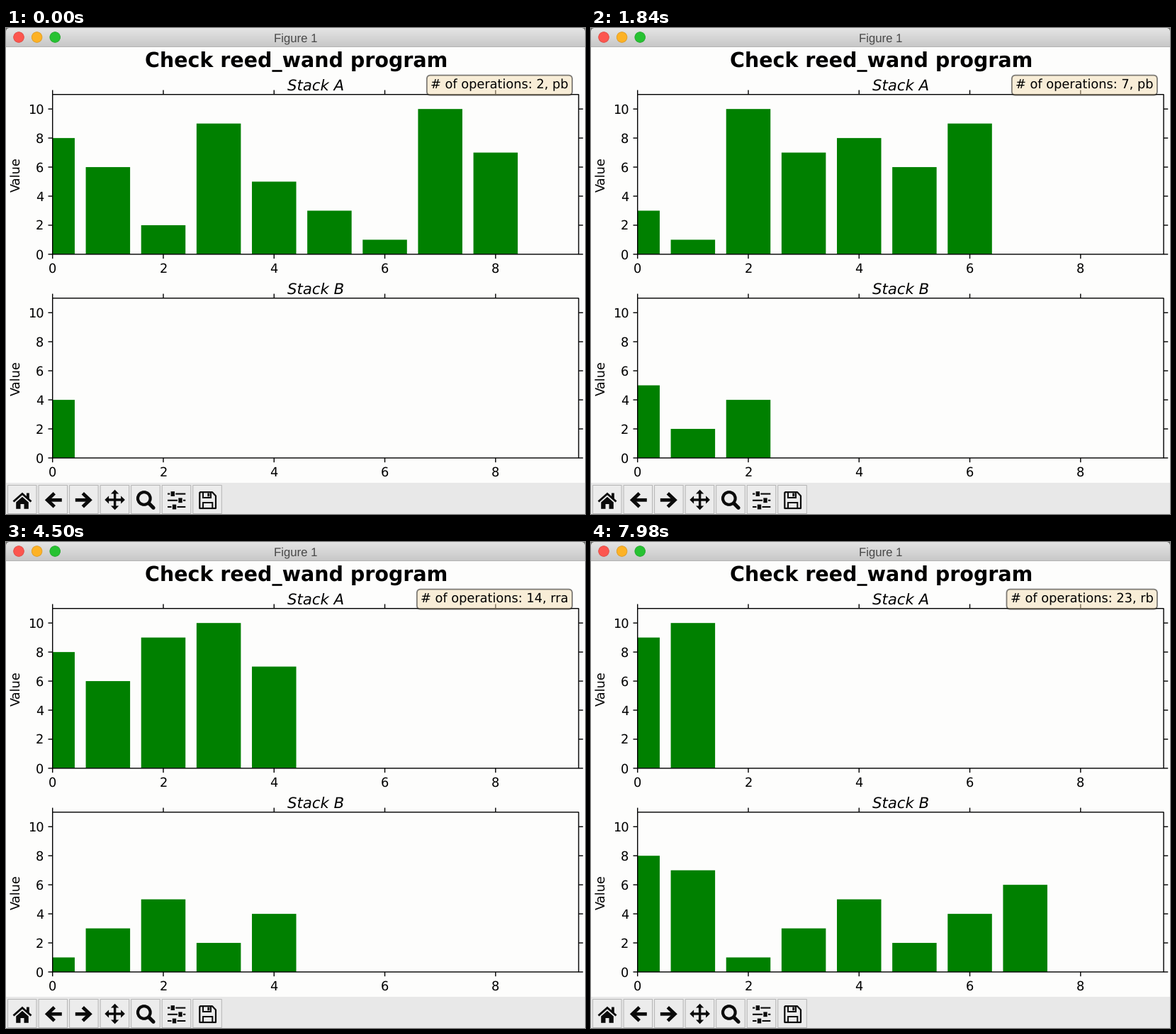
Recreate the animation shown at these times as a matplotlib script. Size 817 by 685 pixels, loop 8 s.

```python
import matplotlib.pyplot as plt
import numpy as np
from matplotlib.animation import FuncAnimation
from matplotlib.patches import Circle, Polygon, Rectangle

W, H = 817, 685
PT = 0.72                      # points per pixel at 100 dpi
EM = 17.73                     # tick label size in pixels
LEFT, UNIT = 65.7, 78.14
RIGHT = LEFT + 9.5 * UNIT
BASES = (318.9, 606.0)
AX_H, TOP_VALUE = 225.2, 11
GREEN, PAPER, BAR = "#008000", "#fdfdfc", "#e8e8e8"
INK = "#0b0b0b"

STEP, FIRST = 380.6, 10.6      # ms per operation, start of the first change
TICK, LOOP = 20, 8000
START_A = [8, 6, 2, 9, 5, 3, 1, 10, 7]
START_B = [4]
OPS = ("ra ra pb ra pb pb pb ra rra rra rra rra rra "
       "pb pb pb ra ra rra rra rb").split()

# the window is a scaled capture: edges and glyphs lie between pixels
plt.rcParams.update({"font.family": "DejaVu Sans", "path.snap": False,
                     "text.hinting": "none"})
fig = plt.figure(figsize=(W / 100, H / 100), dpi=100, facecolor=PAPER)
ax = fig.add_axes([0, 0, 1, 1])
ax.axis("off")


def line(xs, ys, width=1.4, color="black", z=3, cap="butt", join="miter"):
    ax.plot(xs, ys, color=color, lw=width * PT, zorder=z,
            solid_capstyle=cap, solid_joinstyle=join)


def rect(x, y, w, h, color, edge="none", width=0, z=1):
    patch = Rectangle((x, y), w, h, fc=color, ec=edge, lw=width * PT, zorder=z)
    return ax.add_patch(patch)


def poly(points, color=INK, z=6):
    ax.add_patch(Polygon(points, fc=color, ec="none", zorder=z))


def label(x, y, s, size=EM, ha="center", **kw):
    return ax.text(x, y, s, fontsize=size * PT, ha=ha, va="baseline",
                   zorder=5, **kw)


def apply_op(op, a, b):
    a, b = a[:], b[:]
    if op == "pb":
        b.insert(0, a.pop(0))
    elif op == "ra":
        a.append(a.pop(0))
    elif op == "rra":
        a.insert(0, a.pop())
    elif op == "rb":
        b.append(b.pop(0))
    return a, b


def window_bar():
    shade = np.linspace(0.895, 0.785, 26)[:, None, None] * np.ones((1, 1, 3))
    ax.imshow(shade, extent=(0, W, 26, 0), aspect="auto",
              interpolation="nearest", zorder=1)
    line([0, W], [26.5, 26.5], 1, "#b3b3b3")
    lights = (("#fc564f", "#df4640"), ("#fdb225", "#dd9a20"),
              ("#27c232", "#1fa72a"))
    for i, (fill, edge) in enumerate(lights):
        ax.add_patch(Circle((18 + 25.6 * i, 13), 7.3, fc=fill, ec=edge,
                            lw=0.8 * PT, zorder=3))
    label(409, 19.3, "Figure 1", 16.8, color="#484848",
          family="Liberation Sans")
    for x, d in ((0, 1), (W, -1)):
        poly([(x, 0), (x + 4 * d, 0), (x + 1.3 * d, 1.3), (x, 4)], "#6d6f6b")


def plot_frame(base, name):
    top = base - AX_H
    ax.add_patch(Rectangle((LEFT, top), RIGHT - LEFT, AX_H, fc="none",
                           ec="black", lw=1.4 * PT, zorder=3))
    for v in range(0, 10, 2):
        x = LEFT + v * UNIT
        line([x, x], [base, base + 6.2])
        line([x, x], [top - 6.2, top])
        label(x, base + 26, str(v))
    for v in range(0, 11, 2):
        y = base - v * AX_H / TOP_VALUE
        line([LEFT - 6.2, LEFT], [y, y])
        line([RIGHT, RIGHT + 6.2], [y, y])
        label(LEFT - 12.4, y + 6.5, str(v), ha="right")
    label(20, base - AX_H / 2, "Value", rotation=90,
          rotation_mode="anchor")
    label(436.8, top - 4.8, name, 21.3, style="italic")


def arrow_icon(x, d):
    line([x - 8 * d, x + 12 * d], [665.3] * 2, 4.8, INK, 6)
    line([x + 1.5 * d, x - 8.5 * d, x + 1.5 * d], [655.8, 665.3, 674.8],
         4.8, INK, 6)


def move_icon(x, y):
    line([x - 10, x + 10], [y, y], 3.4, INK, 6)
    line([x, x], [y - 10, y + 10], 3.4, INK, 6)
    for dx, dy in ((1, 0), (-1, 0), (0, 1), (0, -1)):
        cx, cy = x + 8.5 * dx, y + 8.5 * dy
        poly([(x + 14.3 * dx, y + 14.3 * dy),
              (cx - 5.6 * dy, cy + 5.6 * dx),
              (cx + 5.6 * dy, cy - 5.6 * dx)])


def toolbar():
    rect(0, 641, W, H - 641, BAR)
    for i in range(7):
        rect(2.5 + 43.55 * i, 644.5, 40.5, 40, "#ececec", "#b5b5b5", 1, 2)

    # home
    line([10.5, 23, 35.5], [667.5, 656.5, 667.5], 2.8, INK, 6)
    rect(29, 655.5, 3.8, 8, INK, z=6)
    poly([(14.2, 668.5), (23, 660.8), (31.8, 668.5), (31.8, 677.8),
          (25.5, 677.8), (25.5, 671), (20.5, 671), (20.5, 677.8),
          (14.2, 677.8)])

    arrow_icon(66.8, 1)
    arrow_icon(109.8, -1)
    move_icon(153.6, 665)

    # zoom
    ax.add_patch(Circle((194.8, 663), 8.8, fc="none", ec=INK, lw=4.2 * PT,
                        zorder=6))
    line([201.5, 208], [669.8, 676.3], 5.2, INK, 6, "round")

    # sliders
    for y, knob in ((656.6, 235.3), (665.8, 246), (675, 237.5)):
        line([228, 253.3], [y, y], 2.1, INK, 6)
        rect(knob - 4, y - 3, 8, 6, "#ececec", z=7)
        rect(knob - 2.7, y - 3.4, 5.4, 6.8, INK, z=8)

    # save
    line([273.3, 291, 296, 296, 273.3, 273.3],
         [654.2, 654.2, 659.5, 677, 677, 654.2], 2.2, INK, 6, join="round")
    line([278, 278, 289, 289], [654.5, 662, 662, 654.5], 2, INK, 6)
    rect(284.3, 655.5, 3, 4.8, INK, z=6)
    line([278, 278, 291.3, 291.3], [677, 669, 669, 677], 2, INK, 6)


window_bar()
label(409.2, 54, "Check reed_wand program", 28.5, weight="bold")
for base, name in zip(BASES, ("Stack A", "Stack B")):
    plot_frame(base, name)
toolbar()

bars = []
for base in BASES:
    row = []
    for i in range(10):
        x0 = max(LEFT, LEFT + (i - 0.4) * UNIT)
        row.append(rect(x0, base, LEFT + (i + 0.4) * UNIT - x0, 0, GREEN))
    bars.append(row)

counter = label(793.6, 85.6, "", ha="right",
                bbox=dict(boxstyle="round,pad=0.3", facecolor="wheat",
                          edgecolor="black", alpha=0.5, linewidth=1.77 * PT))
ax.set_xlim(0, W)
ax.set_ylim(H, 0)

states = [(START_A, START_B, "pb")]
for op in OPS:
    a, b, _ = states[-1]
    states.append((*apply_op(op, a, b), op))


def update(i):
    n = int(np.floor((i * TICK - FIRST) / STEP)) + 1
    n = min(max(n, 0), len(OPS))
    a, b, op = states[n]
    for row, stack in zip(bars, (a, b)):
        for k, bar in enumerate(row):
            bar.set_visible(k < len(stack))
            if k < len(stack):
                bar.set_height(-stack[k] * AX_H / TOP_VALUE)
    counter.set_text(f"# of operations: {n + 2}, {op}")
    return []


anim = FuncAnimation(fig, update, frames=LOOP // TICK, interval=TICK,
                     init_func=lambda: update(0), repeat=True, repeat_delay=0)
plt.show()
```
